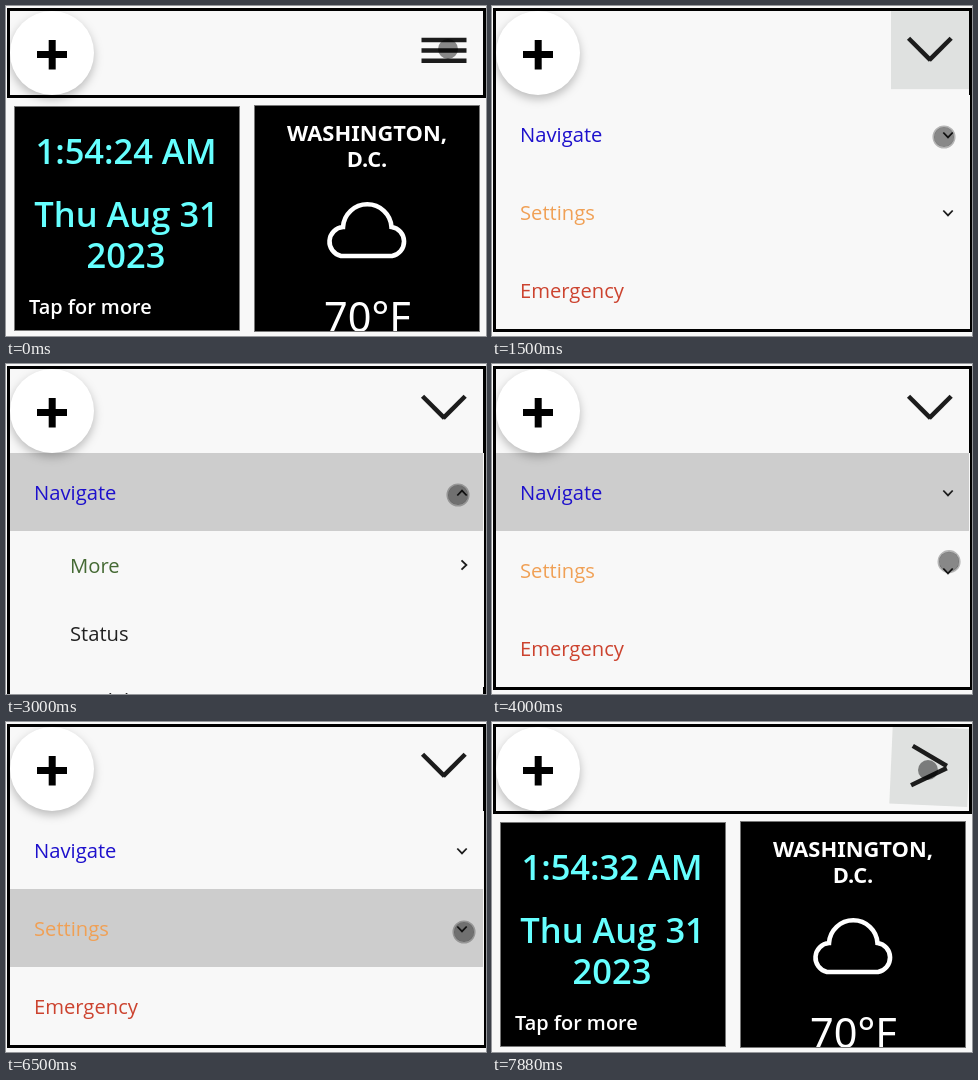
These frames come from a looping animation (480 by 330 pixels, 8000 ms). An HTML page:

```html
<!DOCTYPE html>
<html lang="en">
<head>
<meta charset="utf-8">
<title>Menu demo</title>
<style>
  html, body { margin: 0; width: 100%; height: 100%; overflow: hidden; background: #f8f8f8; }
  svg { display: block; }
  text { font-family: "Open Sans", "Noto Sans", sans-serif; }
  .clock { font-size: 34.5px; font-weight: 600; fill: #6ff; text-anchor: middle; }
  .tap { font-size: 19.9px; font-weight: 600; fill: #fff; }
  .city { font: bold 21.9px "Noto Sans", sans-serif; fill: #fff; text-anchor: middle; }
  .temp { font: 500 41.5px "Noto Sans", sans-serif; fill: #fff; text-anchor: middle; }
  .item { font-size: 20.2px; fill: #222; }
  .line { fill: none; stroke: #1c1c1c; }
  .chevron { stroke-width: 1.8; }
  .bar { stroke-width: 4.5; }
  .card { fill: #000; stroke: #777; }
  .frame { fill: none; stroke: #000; stroke-width: 3; }
  .plus { filter: drop-shadow(0 4px 5px rgba(0, 0, 0, .25)); }
</style>
</head>
<body>
<svg width="480" height="330" viewBox="0 0 480 330">
  <defs>
    <clipPath id="inside"><rect x="4" y="5" width="473" height="325"/></clipPath>
    <clipPath id="cardClip"><rect x="248" y="99" width="226" height="226"/></clipPath>
    <path id="chev" class="line chevron" d="M-4.7-2.5L0 2.4L4.7-2.5"/>
  </defs>

  <g id="cards">
    <rect class="card" x="8.5" y="100.5" width="225" height="224"/>
    <text id="clock" class="clock" x="120" y="158"></text>
    <text class="clock" x="120.5" y="221">Thu Aug 31</text>
    <text class="clock" x="120" y="262">2023</text>
    <text class="tap" x="23" y="308">Tap for more</text>
    <rect class="card" x="248.5" y="99.5" width="225" height="226"/>
    <g clip-path="url(#cardClip)">
      <text class="city" x="361" y="134.5">WASHINGTON,</text>
      <text class="city" x="361" y="160.5">D.C.</text>
      <path d="M335 250A14.7 14.7 0 0 1 337 221A24.3 24.3 0 0 1 385.5 221A14.7 14.7 0 0 1 386 250Z"
            fill="none" stroke="#fff" stroke-width="4.6"/>
      <text class="temp" x="361.5" y="325.5">70°F</text>
    </g>
  </g>

  <rect id="frame" class="frame" x="2.5" y="3.5" width="476"/>

  <g id="menu">
    <rect x="4" y="89" width="474" height="234" fill="#f8f8f8"/>
    <rect id="active" x="4" width="473" height="78" fill="#cdcdcd"/>
    <text class="item" x="28" y="136" style="fill:#1d10cc">Navigate</text>
    <use id="navChev" href="#chev"/>
    <g id="navSub">
      <text class="item" x="64" y="209" style="fill:#456a34">More</text>
      <use href="#chev" transform="translate(458 201) rotate(-90)"/>
      <text class="item" x="64" y="277">Status</text>
      <text class="item" x="64" y="344">Model</text>
    </g>
    <g id="settings">
      <text class="item" x="28" y="214" style="fill:#f0a055">Settings</text>
      <use id="setChev" href="#chev"/>
    </g>
    <text id="sleep" class="item" x="64" y="287">Sleep</text>
    <text id="emergency" class="item" x="28" y="292" style="fill:#cc432f">Emergency</text>
  </g>

  <g clip-path="url(#inside)">
    <g id="icon">
      <rect id="iconBg" x="-39" y="-39" width="78" height="78" fill="#dfe1e0"/>
      <path id="topBar" class="line bar"/>
      <path id="midBar" class="line bar" d="M-22.5 .4H22.5"/>
      <path id="lowBar" class="line bar"/>
    </g>
  </g>

  <circle class="plus" cx="46" cy="47" r="42" fill="#fff"/>
  <path d="M31 48.5H61M46.2 34V63.5" stroke="#000" stroke-width="7"/>

  <g id="dot">
    <circle r="10" fill="rgba(0,0,0,.45)"/>
    <circle id="ring" r="10.6" fill="none" stroke="rgba(0,0,0,.27)" stroke-width="1.9"/>
  </g>
</svg>
<script>
const LOOP = 8000, STEP = 125;
const MENU_OPEN = 375, MENU_CLOSE = 7750;
const NAV_OPEN = 2000, NAV_CLOSE = 3375;
const SET_OPEN = 4750, SET_CLOSE = 6375;

const $ = id => document.getElementById(id);
const within = (t, a, b) => t >= a && t < b;
const show = (id, on) => $(id).style.display = on ? "" : "none";
const set = (id, name, value) => $(id).setAttribute(name, value);

// Eases from 0 to 1 between times a and b.
function ease(t, a, b) {
  const p = Math.min(1, Math.max(0, (t - a) / (b - a)));
  return p * p * (3 - 2 * p);
}

function bar(id, x, y, half, degrees) {
  const a = degrees * Math.PI / 180;
  const dx = half * Math.cos(a), dy = half * Math.sin(a);
  set(id, "d", `M${x - dx} ${y - dy}L${x + dx} ${y + dy}`);
}

// The box turns first; the bars fold into an arrow a little later.
function drawIcon(t) {
  const turn = ease(t, 400, 900) - ease(t, 7650, 7900);
  const fold = ease(t, 500, 1000) - ease(t, 7750, 8050);
  const slide = 8.5 * (ease(t, 250, 500) - ease(t, 500, 875)) - fold;
  const half = 22.5 - 7 * fold * fold;
  set("icon", "transform", `translate(438 44.2) rotate(${90 * turn})`);
  bar("topBar", slide, -10.2, half, 45 * fold);
  bar("lowBar", slide, 10.5, half, -45 * fold);
  show("midBar", t < MENU_OPEN);
  show("iconBg", within(t, MENU_OPEN, NAV_OPEN) || t >= MENU_CLOSE);
}

function drawChevron(id, y, t, open, close) {
  const flip = ease(t, open - 125, open + 100) - ease(t, close - 125, close + 100);
  set(id, "transform", `translate(456 ${y}) rotate(${180 * flip})`);
}

function drawDot(t) {
  const toNav = ease(t, 750, 1125), toSet = ease(t, 3625, 4125), back = ease(t, 6625, 7125);
  const x = 442 + 10 * toNav + 6 * toSet - 22 * back;
  const y = 43 + 88 * toNav + 79 * toSet - 162 * back;
  set("dot", "transform", `translate(${x} ${y})`);
  show("ring", y > 89);
}

function render(t) {
  const open = within(t, MENU_OPEN, MENU_CLOSE);
  const navOpen = within(t, NAV_OPEN, NAV_CLOSE);
  const setOpen = within(t, SET_OPEN, SET_CLOSE);
  const expanded = navOpen || setOpen;

  show("cards", !open);
  show("menu", open);
  show("navSub", navOpen);
  show("settings", !navOpen);
  show("sleep", setOpen);
  show("emergency", !expanded);
  show("active", t >= NAV_OPEN);
  set("active", "y", t < SET_OPEN ? 89 : 167);
  set("frame", "height", !open ? 87 : expanded ? 400 : 321);
  $("clock").textContent = `1:54:${24 + Math.floor((t + 875) / 1000)} AM`;

  drawIcon(t);
  drawChevron("navChev", 129, t, NAV_OPEN, NAV_CLOSE);
  drawChevron("setChev", 207, t, SET_OPEN, SET_CLOSE);
  drawDot(t);
}

const start = performance.now();
function tick() {
  const t = (performance.now() - start) % LOOP;
  render(Math.floor(t / STEP) * STEP);
  requestAnimationFrame(tick);
}
tick();
</script>
</body>
</html>
```
